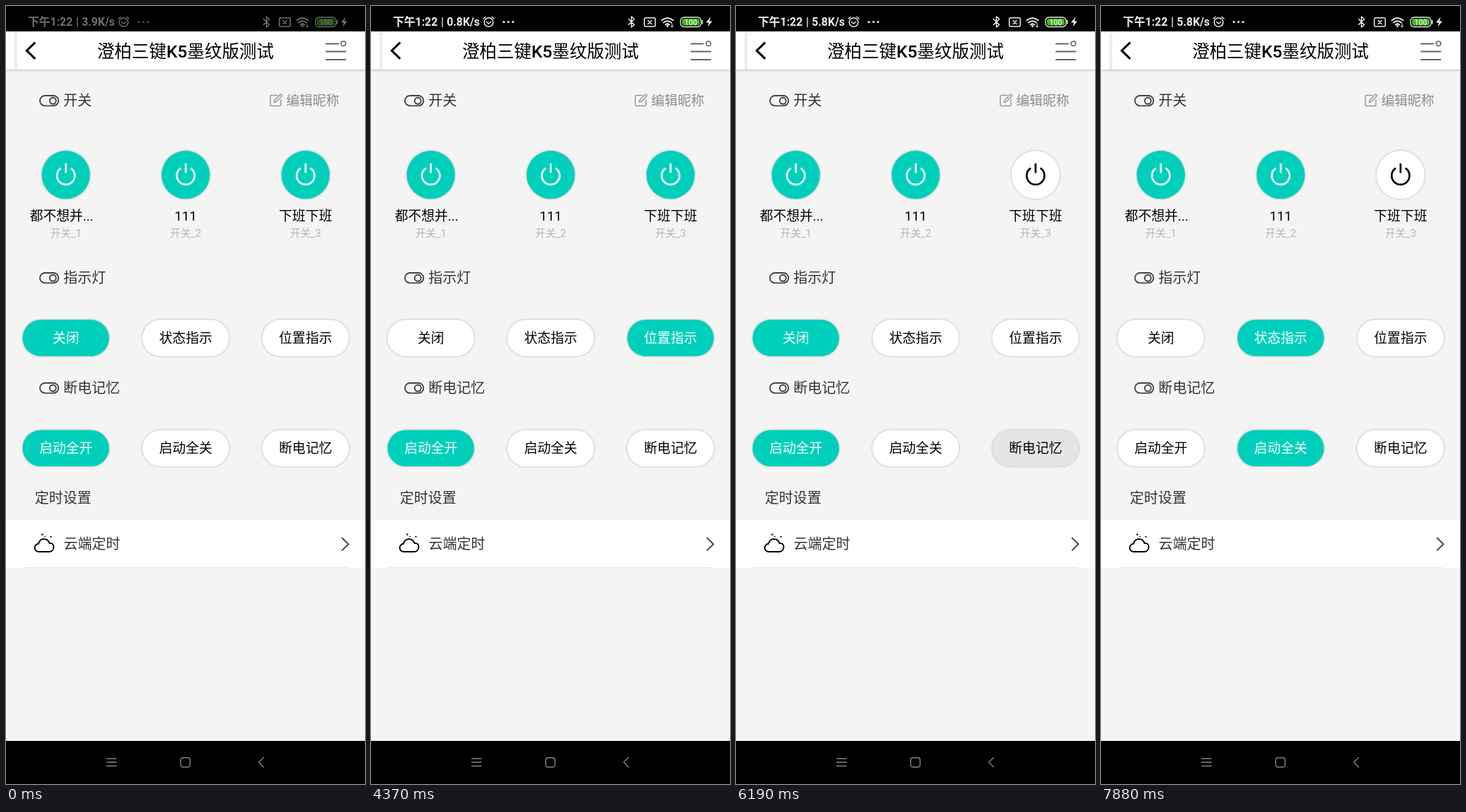
Animation of 508 by 1102 pixels, one loop 8 s. Source, as an HTML page:

```html
<!DOCTYPE html>
<html lang="zh-CN">
<head>
<meta charset="utf-8">
<style>
html, body { margin: 0; width: 100%; height: 100%; overflow: hidden; background: #000; }
svg { display: block; width: 508px; height: 1102px; }
text { font-family: Roboto, "Noto Sans CJK SC", "Noto Sans CJK", sans-serif; }
.line { fill: none; stroke-linecap: round; stroke-linejoin: round; }
</style>
</head>
<body>
<svg id="stage" viewBox="0 0 508 1102" xmlns="http://www.w3.org/2000/svg">
  <defs>
    <filter id="soft" x="-20%" y="-30%" width="140%" height="160%" color-interpolation-filters="sRGB">
      <feDropShadow dx="0" dy="0" stdDeviation="1.8" flood-color="#000" flood-opacity=".3"/>
    </filter>
    <filter id="under" x="-5%" y="-20%" width="110%" height="150%" color-interpolation-filters="sRGB">
      <feDropShadow dx="0" dy="1" stdDeviation="1.6" flood-color="#000" flood-opacity=".25"/>
    </filter>
  </defs>
  <rect width="508" height="1102"/>
  <rect y="36" width="508" height="1005" fill="#f4f4f4"/>

  <g id="status" fill="#eee" stroke="#eee" stroke-width="0">
    <g font-size="15.8" font-weight="600">
      <text x="31" y="28">下午1:22</text>
      <text x="99" y="27.5">|</text>
      <text id="speed" x="107.2" y="28"></text>
    </g>
    <g class="line" stroke-width="1.5">
      <circle cx="166.5" cy="23" r="6.3"/>
      <path d="M163.500 22.500l3 2.500 3-2.500M159 18l3-2.500M174 18l-3-2.500"/>
      <path d="M364.500 18.500l8 8-4 3.500V15l4 3.500-8 8"/>
      <rect x="386.7" y="16.7" width="15.6" height="12.3" rx="2"/>
      <path d="M392 20.500l5 5m0-5l-5 5"/>
      <path d="M411.500 20.300q8-6.500 16 0M414 23.500q5.500-4.500 11 0M416.800 26.500q2.700-2.300 5.400 0" stroke-width="2"/>
    </g>
    <circle cx="419.5" cy="28.5" r="1.5"/>
    <path d="M426 25v5m-1.500-1.500L426 30l1.500-1.500" class="line" stroke-width="1"/>
    <g id="dots"><circle cx="188" cy="22.5" r="1.6"/><circle cx="194.5" cy="22.5" r="1.6"/><circle cx="201" cy="22.5" r="1.6"/></g>
    <rect x="438" y="16" width="29" height="13.5" rx="5" fill="none" stroke-width="1.3"/>
    <rect x="440" y="18" width="25" height="9.5" rx="3" fill="#43b51d"/>
    <path d="M468.700 20.500v4.500" class="line" stroke-width="1.5"/>
    <text x="452.5" y="26.7" font-size="10.5" font-weight="500" text-anchor="middle">100</text>
    <path d="M480.500 15.500l-6.500 8h4l-1.500 6 6.500-8h-4z"/>
  </g>

  <rect y="36" width="508" height="54" fill="#fff" filter="url(#under)"/>
  <rect y="33" width="508" height="3"/>
  <rect x="12" y="36" width="4" height="54" fill="#ededed"/>
  <path d="M41.300 51.700L29.300 63.200l12 11.600" fill="none" stroke="#000" stroke-width="3"/>
  <text x="254" y="72.5" font-size="24.5" text-anchor="middle">澄柏三键<tspan font-weight="500">K5</tspan>墨纹版测试</text>
  <g class="line" stroke="#666" stroke-width="2">
    <path d="M453 53.500h17M453 64.500h27.500M453 76h27.500"/>
    <circle cx="477.5" cy="53.3" r="3.3" stroke-width="1.6"/>
  </g>

  <g class="line" stroke="#999" stroke-width="1.5">
    <path d="M384 126.500h-8.500q-1.500 0-1.500 1.500v12q0 1.500 1.500 1.500h12q1.500 0 1.500-1.500v-7"/>
    <path d="M379.500 136.500l1-3.500 8-8.300 2.300 2.300-8 8.300z"/>
  </g>
  <rect y="728" width="508" height="68" fill="#fff"/>
  <path d="M25 795.500H483" stroke="#e4e4e4"/>
  <path class="line" d="M475.700 753.500l8.800 8.700-8.800 8.700" stroke="#444" stroke-width="1.9"/>
  <g class="line" stroke="#000" stroke-width="1.9">
    <path d="M46.500 773a5.600 5.600 0 0 1-.5-11.200c1-5 5-7.300 8.500-6.800 3.500.3 6 2.500 7 6 8-1.500 8 11.500 0 12z"/>
    <circle cx="51.3" cy="748.6" r="1" stroke-width="1"/>
    <circle cx="55" cy="751.5" r=".4" stroke-width="1"/>
    <circle cx="63.3" cy="751.8" r=".7" stroke-width="1"/>
  </g>
  <g id="body"></g>

  <g class="line" stroke="#848484" stroke-width="1.4">
    <path d="M142.500 1066h13.500M142.500 1071.200h13.500M142.500 1076.500h13.500"/>
    <rect x="247.2" y="1064.7" width="13.3" height="13.3" rx="3.3"/>
    <path d="M364.500 1064.500l-6.800 6.800 6.800 6.800"/>
  </g>
</svg>
<script>
const NS = "http://www.w3.org/2000/svg";
const body = document.getElementById("body");
const status = document.getElementById("status");
const dots = document.getElementById("dots");
const speed = document.getElementById("speed");
const TEAL = "#00d0bb", GREY = "#e5e5e5";
const columns = [84.7, 254.3, 423.9];

function add(tag, attrs, content) {
  const el = document.createElementNS(NS, tag);
  for (const key in attrs) el.setAttribute(key, attrs[key]);
  if (content) el.textContent = content;
  return body.appendChild(el);
}

// Text placed by the vertical middle of its glyphs
function label(str, x, mid, size, fill, anchor = "start") {
  return add("text", { x, y: mid + size * 0.37, "font-size": size, fill, "text-anchor": anchor }, str);
}

function heading(str, mid) {
  const pen = { class: "line", stroke: "#444", "stroke-width": 1.9 };
  add("rect", { x: 48, y: mid - 7, width: 26.3, height: 14.4, rx: 7.2, ...pen });
  add("circle", { cx: 66.3, cy: mid + 0.3, r: 4.5, ...pen });
  label(str, 81.3, mid, 20, "#333");
}

function knob([name, shift], i) {
  const x = columns[i];
  const disc = add("circle", { cx: x, cy: 239.2, r: 34.1, filter: "url(#soft)" });
  const icon = add("path", {
    fill: "none", "stroke-width": 2.7,
    d: `M${x} 223v13.5M${x - 6.8} 229.7a12.6 12.6 0 1 0 13.6 0`
  });
  label(name, x + shift, 296.8, 18.8, "#000", "middle");
  label("开关_" + (i + 1), x, 322, 14.6, "#b5b5b5", "middle");
  return on => {
    disc.setAttribute("fill", on ? TEAL : "#fff");
    icon.setAttribute("stroke", on ? "#fff" : "#000");
  };
}

function pill(name, i, top) {
  const x = columns[i];
  const box = add("rect", { x: x - 61.2, y: top, width: 122.4, height: 51.4, rx: 25.7, filter: "url(#soft)" });
  const text = label(name, x, top + 25.5, 18.8, "#000", "middle");
  return (on, held) => {
    box.setAttribute("fill", held ? GREY : on ? TEAL : "#fff");
    text.setAttribute("fill", on && !held ? "#fff" : "#000");
  };
}

heading("开关", 134);
heading("指示灯", 385);
heading("断电记忆", 541);
label("编辑昵称", 396.5, 133.7, 18.8, "#8c8c8c");
label("定时设置", 40.8, 697, 20, "#333");
label("云端定时", 81.5, 762, 20, "#333");

const knobs = [["都不想并...", -6], ["111", 0], ["下班下班", 0]].map(knob);
const rows = [
  ["关闭", "状态指示", "位置指示"].map((s, i) => pill(s, i, 444.6)),
  ["启动全开", "启动全关", "断电记忆"].map((s, i) => pill(s, i, 600.7))
];

// [time, value]
const chosen = [
  [[0, 0], [3340, 1], [4080, 2], [5280, 0], [7300, 2], [7800, 1]],
  [[0, 0], [6560, 2], [7670, 1]]
];
const rates = [[0, "3.9K/s"], [1280, "0.8K/s"], [5280, "5.8K/s"]];
// [down, up, row, column]
const taps = [
  [2640, 2800, 0, 1], [3710, 3960, 0, 2], [4780, 4950, 0, 0],
  [6140, 6310, 1, 2], [6720, 6970, 0, 2], [6970, 7050, 1, 1], [7380, 7460, 0, 1]
];

function valueAt(track, t) {
  let value;
  for (const [start, v] of track) if (t >= start) value = v;
  return value;
}

function draw(t) {
  const lit = Math.min(1, Math.max(0, (t - 410) / 250));
  status.setAttribute("opacity", 0.47 + 0.53 * lit);
  dots.setAttribute("opacity", 0.65 + 0.35 * lit);
  speed.textContent = valueAt(rates, t);
  knobs.forEach((set, i) => set(i < 2 || t < 5980));
  rows.forEach((row, r) => {
    const pick = valueAt(chosen[r], t);
    row.forEach((set, c) => {
      const held = taps.some(([a, b, y, x]) => t >= a && t < b && y === r && x === c);
      set(pick === c, held);
    });
  });
}

const begin = performance.now();
function tick() {
  draw((performance.now() - begin) % 8000);
  requestAnimationFrame(tick);
}
tick();
</script>
</body>
</html>
```
